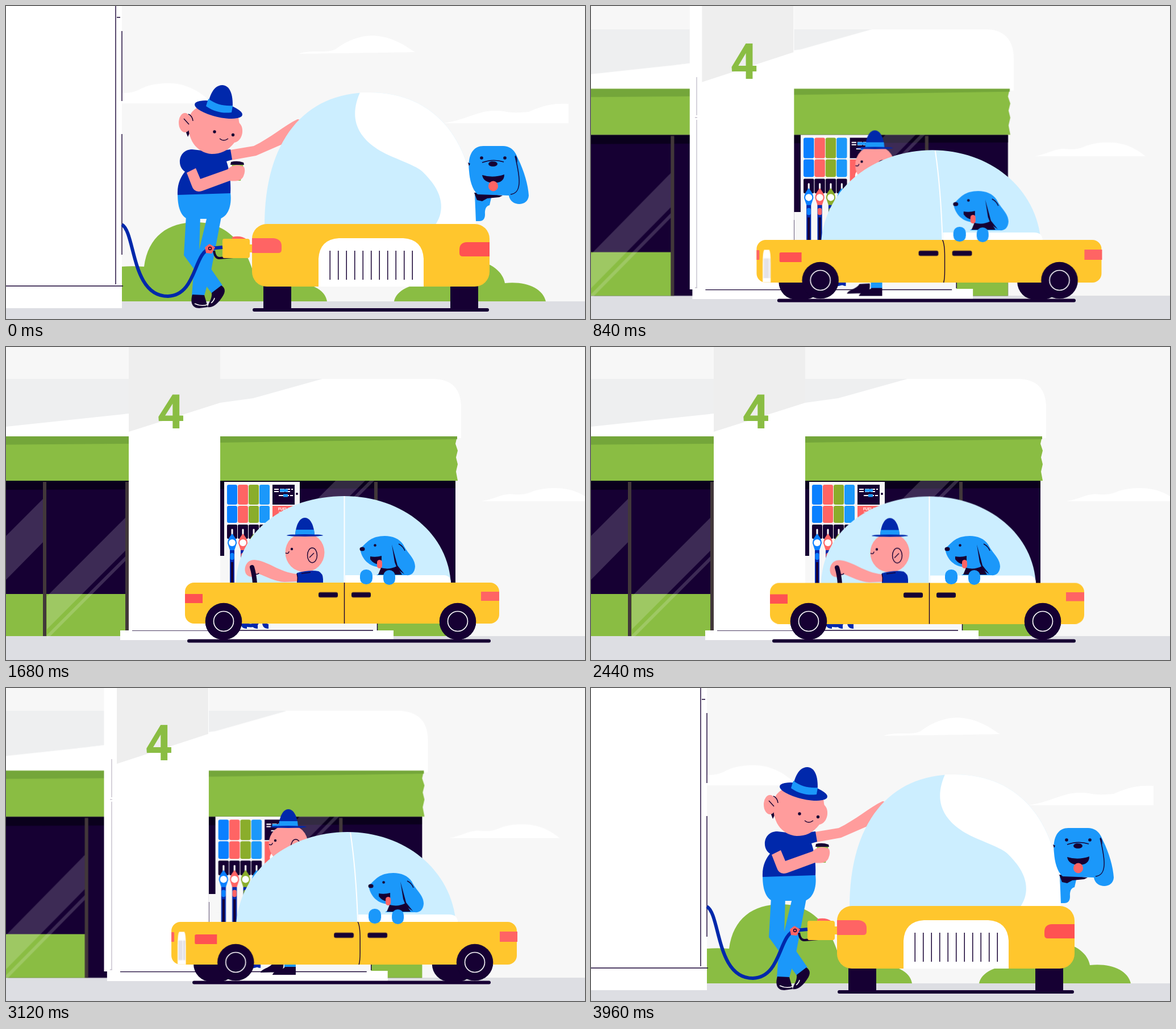
An HTML page without scripts that plays this animation: 1019 px wide and 550 px high, repeating every 4 s.

```html
<!DOCTYPE html>
<html lang="en">
<head>
<meta charset="utf-8">
<title>Filling station</title>
<style>
html,body{margin:0;width:100%;height:100%;overflow:hidden;background:#f7f7f7}
svg{display:block;width:100vw;height:100vh}
.n{fill:#160033}.b{fill:#1b98fa}.u{fill:#0028ab}.g{fill:#8abd43}.p{fill:#ff9c9c}
.r{fill:#ff6464}.w{fill:#fff}.y{fill:#ffc62d}.s{fill:#f7f7f7}
.ln{fill:none;stroke:#160033;stroke-width:1.4}
.rim{fill:none;stroke:#fff;stroke-width:1.6}
.tyre{fill:#160033;stroke:#160033;stroke-linejoin:round}
.body{fill:#ffc62d;stroke:#ffc62d;stroke-linejoin:round}

/* Camera swing: four poses --a to --d, played forth and back */
.m,.t,.early,.mid,.late,.profile,.settle{animation:2s -20ms infinite alternate both}
.m{animation-name:morph}
.t{animation-name:move}
.early{animation-name:early}
.mid{animation-name:mid}
.late{animation-name:late}
.profile{animation-name:profile}
.m.door{animation-name:morph,door}
.t.door{animation-name:move,door}
.m.fade{animation-name:morph,fade}
.m.body{animation-name:morph,corner}
.m.tyre{animation-name:morph,tread}
.settle{animation-name:settle}
.step{animation:step 4s infinite}
@keyframes morph{
 0%,1%{d:var(--a);animation-timing-function:cubic-bezier(.8,0,.9,.2)}
 29%{d:var(--b);animation-timing-function:cubic-bezier(.3,.25,.55,.9)}
 43%{d:var(--c,var(--b));animation-timing-function:cubic-bezier(.1,.5,.2,1)}
 57%,100%{d:var(--d,var(--c))}
}
@keyframes move{
 0%,1%{transform:var(--a);animation-timing-function:cubic-bezier(.8,0,.9,.2)}
 29%{transform:var(--b);animation-timing-function:cubic-bezier(.3,.25,.55,.9)}
 43%{transform:var(--c);animation-timing-function:cubic-bezier(.1,.5,.2,1)}
 57%,100%{transform:var(--d,var(--c))}
}
@keyframes corner{0%,1%{stroke-width:52px}29%{stroke-width:44px}43%,100%{stroke-width:32px}}
@keyframes tread{0%,1%{stroke-width:16px}29%{stroke-width:28px}43%,100%{stroke-width:62px}}
@keyframes early{0%,36%{visibility:visible}36.01%,100%{visibility:hidden}}
@keyframes mid{0%,36%{visibility:hidden}36.01%,50%{visibility:visible}50.01%,100%{visibility:hidden}}
@keyframes late{0%,50%{visibility:hidden}50.01%,100%{visibility:visible}}
@keyframes profile{0%,36%{visibility:hidden}36.01%,100%{visibility:visible}}
@keyframes door{0%,20%{opacity:0}24%,100%{opacity:1}}
@keyframes fade{0%,29%{opacity:1}43%{opacity:.25}57%,100%{opacity:0}}
@keyframes settle{0%,58%{transform:none}67%{transform:translateY(2px)}77%{transform:translateY(.5px)}85%,100%{transform:none}}
@keyframes step{0%,60%{transform:none}78%{transform:translate(-2px,-4px)}90%,100%{transform:none}}
</style>
</head>
<body>
<svg viewBox="0 0 1019 550" preserveAspectRatio="none">
<defs>
 <g id="nozzle">
  <rect x="389" y="242" width="18" height="35" rx="3" fill="currentColor"/>
  <rect x="389" y="279" width="18" height="30" rx="3" fill="currentColor"/>
  <rect class="n" x="389" y="312" width="18" height="25" rx="2"/>
  <path d="M398 350V484Q398 491 405 491" fill="none" stroke="#0028ab" stroke-width="8"/>
  <path d="M398 378V484" class="ln" style="stroke-width:4"/>
  <path d="M398 321V334" stroke="#fff" stroke-width="3" stroke-linecap="round"/>
  <path d="M398 328C402 333 406 338 406 345L402 357H394L390 345C390 338 394 333 398 328Z" fill="currentColor"/>
  <rect x="394.500" y="362" width="7" height="12" rx="3" fill="currentColor"/>
  <circle class="w" cx="398" cy="344" r="6"/>
 </g>
 <g id="head">
  <circle class="p" cx="526" cy="361" r="34.500"/>
  <path class="u" d="M509 331C510 312 517 300 526 300C535 300 542 312 543 331Z"/>
  <path class="b" d="M510 321H542L543 331H509Z"/>
  <ellipse class="u" cx="526" cy="331" rx="32" ry="2"/>
  <ellipse class="ln" cx="539" cy="366" rx="8.500" ry="13"/>
  <path class="ln" d="M534 370L542 362M492 362Q498 364 498 359"/>
  <circle class="n" cx="503" cy="355" r="2.200"/>
 </g>
 <g id="wheel">
  <circle class="n" r="32.300"/><circle class="rim" r="17.500" vector-effect="non-scaling-stroke"/>
 </g>
</defs>

<rect class="s" width="1019" height="550"/>
<path class="w t" d="M0 0C20-8 50 0 65-8C85-24 110-32 128-32C165-32 190-12 205-3C150-2 60-1 0 0Z" style="--a:translate(515px,84px) scale(1);--b:translate(655px,114px) scale(.92);--c:translate(1150px,184px) scale(.8)"/>
<path class="w t" d="M0 0C25-4 40-17 60-18C80-16 90-17 102-22C120-31 136-33 156-33C190-33 215-16 232 0Z" style="--a:translate(131px,171px) scale(1,1.07);--b:translate(285px,194px) scale(1);--c:translate(779px,264px) scale(.845,.74);--d:translate(836px,271px) scale(.845,.7)"/>
<path class="w t" d="M0 0C40-6 60-22 90-22C115-22 110-16 150-20C180-34 200-35 220-34V0Z" style="--a:translate(770px,206px);--b:translate(893px,227px) scale(.95);--c:translate(1100px,280px)"/>
<path class="g t" d="M150 519V470Q190 454 243 458C250 405 285 380 334 380C390 380 425 420 440 485H500C535 485 562 498 565 519ZM683 519C687 499 715 485 759 487C765 457 790 440 820 445C855 450 875 468 878 487C915 483 945 496 950 519Z" style="--a:translate(0,0);--b:translate(228px,-2px);--c:translate(900px,-10px)"/>
<rect class="t" y="519" width="1019" height="60" fill="#dddee3" style="--a:translate(0,0);--b:translate(0,-2px);--c:translate(0,-10px);--d:translate(0,-11px)"/>

<!-- shop -->
<g class="t" style="--a:translate(-1100px,-80px) scale(1.05);--b:translate(-640px,-60px) scale(1.05);--c:translate(-75.6px,-17.6px) scale(1.022,1.037);--d:translate(0,0) scale(1)">
 <path class="w" d="M-300 56H750Q801 56 801 107V160H-300Z"/>
 <path d="M-300 56H557L435 90 377 98 216 117 0 140-300 172Z" fill="#eeeff0"/>
 <path class="w" d="M216 117L377 98V150H216Z"/>
 <path class="n" d="M-300 235H791V508H-300Z"/>
 <path d="M-300 235H791V248L-300 252Z" fill="#0a001c"/>
 <path class="g" d="M-300 157H794L791 170 795 182 792 194 795 206 792 219 795 235H-300ZM-300 434H213V508H-300ZM653 485H791V508H653Z"/>
 <path d="M-300 157H794V162L377 168 216 170-300 174Z" fill="#74a63a"/>
 <path d="M68 264L-60 392V470L68 340ZM212 298L72 438V496L212 356ZM212 366L72 506V514L212 374ZM580 235H632L530 337H478ZM648 235H640L538 337H546Z" fill="#fff" opacity=".17"/>
 <path d="M68 237V508M213 237V508M651 237V485" stroke="#42383a" stroke-width="6"/>
</g>

<!-- pump -->
<path class="s m" style="--a:path('M100 320H190V500H100Z');--b:path('M235 320H284V500H235Z');--c:path('M357 362H643V500H357Z');--d:path('M373 367H654V500H373Z')"/>
<g class="t" style="--a:matrix(.05,.08,0,1.5,150,-270);--b:matrix(.34,.08,0,1.45,109,-255);--c:matrix(1.02,0,0,1.03,-23,-18);--d:matrix(1,0,0,1,0,0)">
 <path class="s" d="M384 237H517V400H384Z"/>
 <use href="#nozzle" color="#0a80ff"/>
 <use href="#nozzle" x="19" color="#ff6464"/>
 <use href="#nozzle" x="38" color="#8aad2b"/>
 <use href="#nozzle" x="57" color="#1b98fa"/>
 <path class="n" d="M469 242H508V277H469Z"/>
 <circle class="n" cx="512" cy="258" r="2"/>
 <path d="M472 250H505M472 254H500M480 261H505" stroke="#fff" stroke-width="2" stroke-dasharray="8 2"/>
 <path d="M482 252H496M488 261H496" stroke="#1b98fa" stroke-width="5"/>
 <path class="r" d="M469 279H511V322H469Z"/>
 <ellipse class="w" cx="491" cy="307" rx="13" ry="12"/>
 <path d="M480 290H500M485 293H497" stroke="#fff" stroke-width="1"/>
 <path d="M484 304H498M484 309H498" stroke="#160033" stroke-width="3" stroke-dasharray="3 1"/>
 <text x="479" y="287" font-family="Roboto,sans-serif" font-size="7" font-weight="700" fill="#fff">FUEL UP</text>
</g>
<path class="w m" style="--a:path('M0 485H204V531H0Z');--b:path('M0 485H336V519H0Z');--c:path('M178 497H672V515H178Z');--d:path('M201 498H682V515H201Z')"/>
<path class="ln m" style="--a:path('M180 326V486M190 319V474M100 497H190');--b:path('M235 326V486M284 319V474M180 495H325');--c:path('M357 376V412M643 486V496M201 498.500H635');--d:path('M373.500 381V412M653.500 485V498M222 498H646')"/>

<!-- column -->
<path class="w m" style="--a:path('M-900 0H204V531H-900Z');--b:path('M-450 0H235V490H-450Z');--c:path('M173 0H357V498H173Z');--d:path('M216 0H377V498H216Z')"/>
<g class="t" style="--a:translate(102px,-330px) scale(.2,1);--b:translate(102px,-180px) scale(.354,1);--c:translate(-21px,-20px) scale(1,1.03);--d:translate(0,0) scale(1)">
 <path d="M216-40H377V98L216 149Z" fill="#eee"/>
 <text class="g" x="266" y="143" font-family="Roboto,sans-serif" font-size="84" font-weight="600">4</text>
</g>
<path class="ln m fade" style="--a:path('M193 0V489M204 44V167M204 225V437M195 20H201M0 492H206');--b:path('M145 0V484M154 80V192M154 245V437M147 59H153M0 487.500H155');--c:path('M186 200V495M186 125V192M186 245V437M183 196H187M183 495H187')"/>

<!-- man by the pump -->
<g class="early"><g class="t" style="--a:translate(0,0) scale(1);--b:translate(76px,54px) scale(.89);--c:translate(225px,90px) scale(.75);--d:translate(225px,90px) scale(.75)">
 <path class="p" d="M394 253L436 246C465 232 490 210 513 199Q519 199 516 204L486 243 440 263 396 271Z"/>
 <path class="b" d="M354 370H379L361 465 349 509H327L330 470Z"/>
 <path class="b" d="M317 368H342L340 432 381 491 362 505 313 438Z"/>
 <path class="n" d="M328 507C324 520 327 531 340 531L355 529C352 518 350 512 349 508ZM362 504L379 491C388 497 386 505 378 515C372 524 362 531 355 529C357 520 363 515 362 504Z"/>
 <path d="M332 523Q345 529 356 524M361 522Q366 518 367 513" fill="none" stroke="#fff" stroke-width="1.500"/>
 <path class="b" d="M302 330L395 328C398 352 390 370 376 374H319C306 368 302 350 302 330Z"/>
 <path class="u" d="M302 332C301 312 308 300 315 291C300 282 303 252 328 252L362 256 395 252 398 270 388 273C394 290 396 310 395 329Z"/>
 <path class="n" d="M315 217L326 217 320 230Z"/>
 <ellipse class="p" cx="315" cy="205" rx="11" ry="17"/>
 <path class="p" d="M322 195C330 176 350 170 372 177L409 194C410 202 410 204 411 206C420 214 417 237 402 240C390 255 378 260 362 260C336 258 316 235 322 195Z"/>
 <path class="ln" d="M321 190Q328 193 329 202M313 198L322 208M376 233Q383 239 391 233"/>
 <circle class="n" cx="367" cy="221" r="2.700"/><circle class="n" cx="399.500" cy="226.500" r="2.700"/>
 <ellipse class="u" cx="374" cy="182" rx="43" ry="13" transform="rotate(13 374 182)"/>
 <path class="u" d="M353 181C357 165 362 139 381 139C398 140 401 165 398 188Z"/>
 <path class="b" d="M356 163C369 173 384 176 399 175L397 187C382 189 366 186 352 176Z"/>
 <g class="t" style="--a:rotate(0deg);--b:translate(322px,300px) rotate(20deg) translate(-322px,-300px);--c:translate(322px,300px) rotate(20deg) translate(-322px,-300px);--d:translate(322px,300px) rotate(20deg) translate(-322px,-300px)">
  <path class="g" d="M397 277H418L413 307H402Z"/>
  <path class="n" d="M396 274Q407 271 418 275L419 279H395Z"/>
  <path class="p" d="M318 293L334 285 342 304 390 287C398 278 412 278 419 283Q422 289 418 299C414 309 400 308 394 307L345 325Q331 329 327 316Z"/>
 </g>
</g></g>
<g class="t" style="--a:translate(0,0);--b:translate(32px,28px);--c:translate(120px,40px)">
 <path d="M366 430Q368 444 376 443L400 441" fill="none" stroke="#160033" stroke-width="4"/>
 <path class="r" d="M398 406Q412 402 424 410H398Z"/>
 <path class="y" d="M384 409H425Q429 409 429 413V419H440V433H429V439Q429 443 425 443H384Q381 443 381 439V413Q381 409 384 409Z"/>
</g>
<path class="m" fill="none" stroke="#0028ab" stroke-width="6" style="--a:path('M204 384C228 398 220 510 285 510C336 508 330 432 360 426L381 424');--b:path('M281 478C285 500 305 505 318 504C340 500 345 470 352 452L360 440');--c:path('M405 470C410 490 430 491 440 488C445 480 450 470 455 460L470 450')"/>
<g class="t" style="--a:translate(0,0);--b:translate(32px,28px);--c:translate(120px,40px)">
 <path class="r" d="M350 424L358 418 368 424 362 435 352 434Z"/><circle cx="359" cy="426" r="2.500" class="ln"/>
</g>

<!-- man walking round the car -->
<g class="mid"><g class="t" style="--a:translate(-126px,-122px);--b:translate(-126px,-122px);--c:translate(-27px,-83px);--d:translate(0,0)"><g class="step">
 <path class="u" d="M505 385H552V510H505Z"/>
 <path class="b" d="M519 510H539V579H519Z"/>
 <path class="n" d="M477 587C479 580 494 579 499 570L517 569Q519 578 513 586ZM498 591C500 583 515 584 520 577H539V591Z"/>
 <use href="#head"/>
</g></g></g>

<!-- car -->
<path class="ln m" stroke-linecap="round" style="stroke-width:6;--a:path('M437 534H847');--b:path('M388 529H877');--c:path('M331 517.500H850');--d:path('M322 516.500H850')"/>
<path class="tyre m" style="--a:path('M461 490H494V529H461Z');--b:path('M541 490H575V517H541Z');--c:path('M781 483H795V485H781Z');--d:path('M794 482H796V483H794Z')"/>
<path class="tyre m" style="--a:path('M461 490H494V529H461Z');--b:path('M394 490H428V517H394Z');--c:path('M361 483H375V485H361Z');--d:path('M382 482H384V483H382Z')"/>
<path class="tyre m" style="--a:path('M790 490H823V529H790Z');--b:path('M834 490H866V517H834Z');--c:path('M824 482H826V483H824Z');--d:path('M794 482H796V483H794Z')"/>
<path class="tyre m" style="--a:path('M790 490H823V529H790Z');--b:path('M683 490H715V517H683Z');--c:path('M403 482H405V483H403Z');--d:path('M382 482H384V483H382Z')"/>
<g class="settle">
 <path class="m" fill="#cef" style="--a:path('M455 385C455 238 524 152 640 152C756 152 827 238 827 385Z');--b:path('M438 395C440 250 530 177 632 177C740 177 825 270 825 395Z');--c:path('M405 415C412 318 500 253 601 253C700 253 785 318 792 415Z');--d:path('M405 418C405 325 490 262 595 262C700 262 780 330 783 418Z')"/>
 <path class="w m" style="--a:path('M623 152C595 215 640 248 680 265C728 285 730 286 745 304C772 335 770 365 755 385H827C827 238 756 152 640 152Z');--b:path('M712 190C709 240 735 268 775 283C780 285 785 285 790 286C792 287 793 287 794 287H796C775 240 745 210 712 190Z');--c:path('M792 411C792 411 792 411 792 411C792 411 792 411 792 411C792 411 792 411 792 411H792C792 411 792 411 792 411Z')"/>
 <g class="late">
  <use href="#head"/>
  <path class="u" d="M512 397Q535 391 550 394Q558 398 558 408V418H512Z"/>
  <path class="p" d="M513 399C480 396 460 375 437 374C424 374 419 386 421 395C423 405 437 407 443 398C458 403 475 413 490 413L513 412Z"/>
  <path class="ln" d="M512 398Q514 405 513 412M520 398L536 396M439 399Q444 400 445 397"/>
  <path d="M433 387Q437 400 438 416" class="ln" stroke-linecap="round" style="stroke-width:8"/>
 </g>
 <path class="m" fill="none" stroke="#fff" stroke-width="2" style="--a:path('M640 153Q740 180 800 300');--b:path('M690 183Q750 215 775 283');--c:path('M606 254Q616 320 619 411');--d:path('M595.500 262Q595.500 330 595.500 414')"/>
 <path class="w m" style="--a:path('M780 390V372H820Q826 372 826 390Z');--b:path('M775 392V378H820Q824 379 825 392Z');--c:path('M620 412V398H780Q795 398 795 412Z');--d:path('M597 415V401H772Q783 402 783 415Z')"/>
 <path class="body m" style="--a:path('M459 409H825V467H459Z');--b:path('M371 412H889V469H371Z');--c:path('M307 427H883V470H307Z');--d:path('M331 430H852V470H331Z')"/>
 <g class="t" style="--a:translate(0,0) scale(1);--b:translate(-42.6px,38.4px) scale(.892,.918);--c:translate(259px,151px) scale(.078,.68);--d:translate(315px,151px) scale(0,.68)">
  <path class="w" d="M550 493V444Q552 410 586 408H699Q733 410 735 444V493Z"/>
  <path d="M569.500 455.500H716" stroke="#160033" stroke-width="51" stroke-dasharray="1.500 13"/>
 </g>
 <path class="r m" style="--a:path('M433 408H470C478 408 485 413 485 421V428Q485 434 479 434H433Z');--b:path('M349 413H377C384 413 390 418 390 425V433Q390 437 386 437H349Z');--c:path('M291 429H295C296 429 296 430 296 431V445Q296 446 295 446H291Z');--d:path('M315 434H315C315 434 315 434 315 435V449Q315 450 315 450H315Z')"/>
 <path class="m" fill="#ff5252" style="--a:path('M851 415H811C803 415 798 420 798 428V434Q798 440 804 440H851Z');--b:path('M726 419H680C672 419 667 425 667 432V438Q667 442 671 442H724Z');--c:path('M371 433H335C333 433 332 434 332 435V448Q332 450 334 450H371Z');--d:path('M346 434H315C315 434 315 434 315 435V449Q315 450 315 450H346Z')"/>
 <path class="r m" style="--a:path('M851 415H851V440H851Z');--b:path('M904 413H911V437H904Z');--c:path('M869 428H900V446H869Z');--d:path('M836 430H868V446H836Z')"/>
 <path class="ln m door" style="--a:path('M845 391Q851 391 851 415V465Q851 490 845 491');--b:path('M795 391Q817 391 817 415V465Q817 490 797 491');--c:path('M619 411Q623 418 623 440V465Q623 480 621 486');--d:path('M595.500 414Q595.500 420 595.500 440V465Q595.500 480 595.500 486')"/>
 <g class="n t" style="--a:translate(851px,420px) scale(0,1.4);--b:translate(816px,421.500px) scale(.39,1.44);--c:translate(624px,434.500px) scale(1.02,1);--d:translate(596px,435.500px) scale(1)">
  <rect x="-46" y="-4.500" width="34" height="9" rx="3"/><rect x="12" y="-4.500" width="34" height="9" rx="3"/>
 </g>
</g>
<use href="#wheel" class="t door" style="--a:translate(831px,508px) scale(.01,.8);--b:translate(721px,493px) scale(.32,1.18);--c:translate(404px,482px) scale(1);--d:translate(383px,482px) scale(1)"/>
<use href="#wheel" class="t door" style="--a:translate(831px,508px) scale(.01,.8);--b:translate(871px,493px) scale(.32,1.18);--c:translate(825px,482px) scale(1);--d:translate(795px,482px) scale(1)"/>

<!-- dog, facing -->
<g class="early"><g class="t" style="--a:translate(0,0) scale(1);--b:translate(19px,39px) scale(.92);--c:translate(60px,90px) scale(.8);--d:translate(60px,90px) scale(.8)">
 <g class="t" style="--a:translate(827px) scale(0,1);--b:translate(827px) scale(1,1);--c:translate(827px) scale(1,1);--d:translate(827px) scale(1,1)">
  <path class="b" d="M0 262C-13 285-17 315-16 335C-13 348 2 348 8 335L30 345V378Q18 380-3 377Q-8 365-3 350Z"/>
  <path class="b" d="M20 330H49V360H20Z"/>
 </g>
 <path class="b" d="M825 328H856L851 350Q842 352 843 366Q843 378 833 378H827Z"/>
 <path class="n" d="M824 328L874 333 868 336 847 338 838 343 829 341Z"/>
 <path class="b" d="M815 290C812 262 822 246 840 246H875C892 247 897 258 901 268C912 290 919 315 920 333C919 353 888 353 885 333L830 331C820 322 816 305 815 290Z"/>
 <path class="ln" d="M896 264C901 285 904 300 903 312C902 325 897 330 888 331M838 275Q857 268 876 274"/>
 <path class="n" d="M896 262Q900 264 900 276ZM813 275L817 277 815 281ZM838 297Q857 303 877 296Q877 311 858 311Q840 310 838 297Z"/>
 <circle class="n" cx="837" cy="267" r="2.800"/><circle class="n" cx="878" cy="267" r="2.800"/>
 <ellipse class="n" cx="857" cy="277.500" rx="8" ry="4.500"/>
 <ellipse class="r" cx="857.500" cy="316.500" rx="8.500" ry="9"/>
</g></g>

<!-- dog, side view -->
<g class="profile">
 <g class="t" style="--a:translate(150px,-65px);--b:translate(150px,-65px);--c:translate(15px,-7px);--d:translate(0,0)">
  <path class="b" d="M623 354C630 350 635 339 651 334C670 329 690 333 699 347C706 362 720 371 720 386C719 398 712 402 704 401H652C661 396 662 392 658 387C640 386 626 374 623 354Z"/>
  <path class="n" d="M660 388Q675 392 688 385L697 400H655ZM641 368Q651 370 661 367V380Q650 385 641 373ZM679 347L689 384 701 399Q688 392 684 378Z"/>
  <path class="ln" d="M691 346Q699 350 702 358"/>
  <rect class="r" x="653" y="374" width="9" height="15" rx="4.500"/>
  <ellipse class="n" cx="627" cy="355" rx="4.500" ry="3.500"/>
  <circle class="n" cx="649.500" cy="348.500" r="2.300"/>
 </g>
 <g class="b t" style="--a:translate(150px,-62px);--b:translate(150px,-62px);--c:translate(15px,-3px);--d:translate(0,0)">
  <rect x="623" y="391" width="22" height="26" rx="10.500"/><rect x="664" y="392" width="21" height="26" rx="10.500"/>
 </g>
</g>
</svg>
</body>
</html>
```
